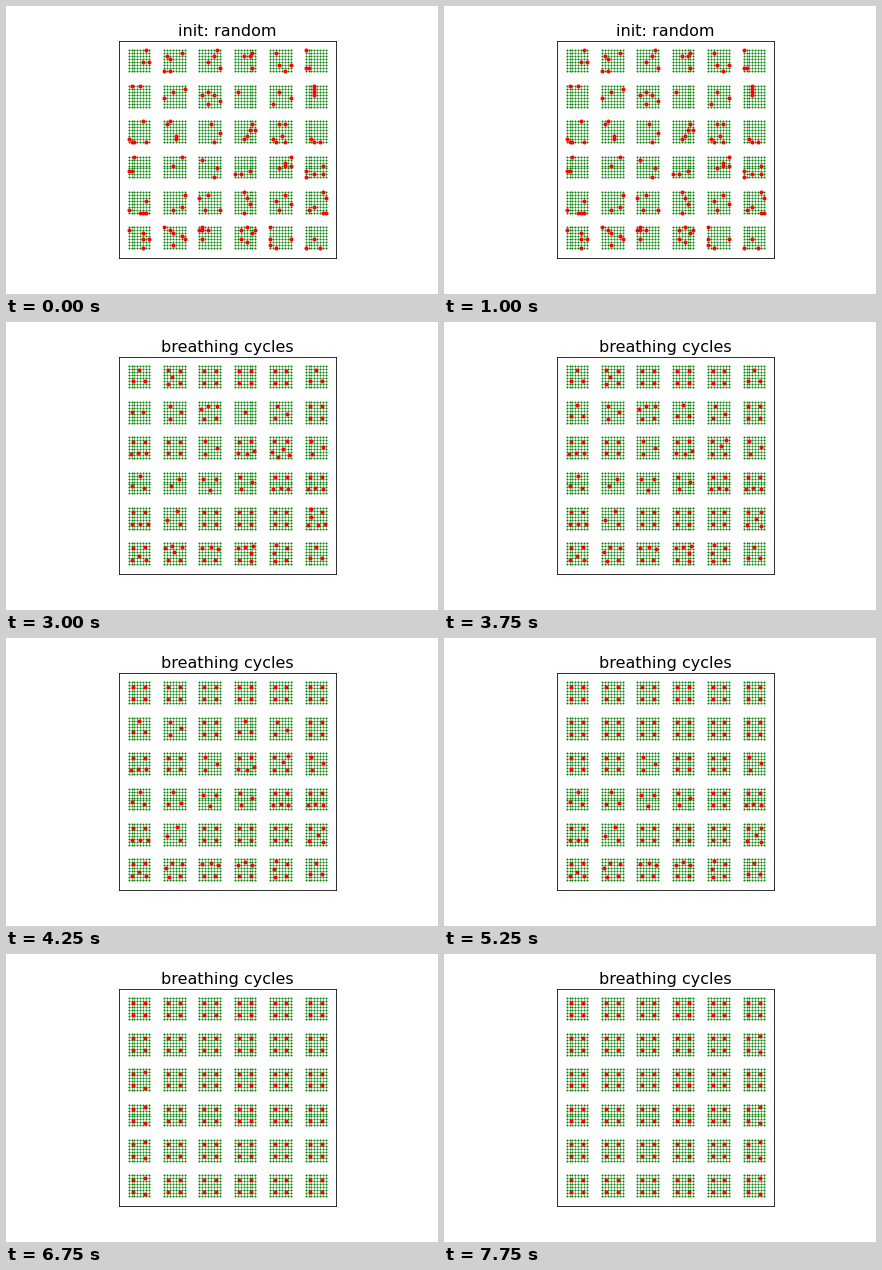
A matplotlib script for the animation above (8000 ms loop, 432 px wide and 288 px high).

```python
import itertools

import matplotlib.pyplot as plt
import numpy as np
from matplotlib.animation import FuncAnimation

TILES, SIDE, PITCH = 6, 8, 12
SPAN = PITCH * (TILES - 1) + SIDE - 1
INTRO, FRAMES, STEP_MS = 12, 32, 250
SETTLED = 15

# Centroids per tile at the start; four per tile is the optimum.
COUNTS = np.array([
    [3, 5, 4, 4, 4, 3],
    [2, 3, 5, 1, 3, 4],
    [5, 4, 3, 5, 6, 3],
    [3, 2, 3, 3, 5, 5],
    [5, 3, 4, 4, 4, 6],
    [5, 6, 5, 6, 5, 3],
])
CELLS = np.array(list(itertools.product(range(SIDE), repeat=2)), float)
QUAD = np.array(list(itertools.product((1.5, 5.5), repeat=2)))


def sample(row, col, k):
    rng = np.random.default_rng([row, col, k])
    return rng.choice(CELLS, k, replace=False)


def lloyd(centers, rounds=20):
    centers = centers.copy()
    for _ in range(rounds):
        gaps = ((CELLS[:, None] - centers) ** 2).sum(axis=2)
        owner = gaps.argmin(axis=1)
        for i in np.unique(owner):
            centers[i] = CELLS[owner == i].mean(axis=0)
    return centers


def fit(row, col, k):
    return QUAD if k == 4 else lloyd(sample(row, col, k))


def counts_at(cycle):
    """Each cycle moves centroids from the richest tile to the poorest."""
    counts = COUNTS.copy()
    for _ in range(cycle * 6 // 5):
        if counts.max() == counts.min():
            break
        counts.flat[counts.argmax()] -= 1
        counts.flat[counts.argmin()] += 1
    return counts


def swaying(cycle):
    """Tiles of one column still sway while a ripple crosses the grid."""
    if cycle < SETTLED:
        return set()
    col = round((cycle - SETTLED) * (TILES - 1) / 4)
    rows = np.random.default_rng(cycle).choice(TILES, 4, replace=False)
    return {(row, col) for row in rows}


def sway(centers):
    right = centers[:, 0] > SIDE / 2
    stretch = 0.7 * np.sign(centers[:, 1] - SIDE / 2)
    return centers + np.column_stack([0 * stretch, right * stretch])


def centroids(frame):
    cycle = frame - INTRO
    counts, moving = counts_at(max(cycle, 0)), swaying(cycle)
    points = []
    for row, col in np.ndindex(TILES, TILES):
        place = sample if cycle < 0 else fit
        spots = place(row, col, counts[row, col])
        if (row, col) in moving:
            spots = sway(spots)
        points.append(spots + (PITCH * col, PITCH * row))
    x, y = np.vstack(points).T
    return x, SPAN - y


def heading(frame):
    if frame >= INTRO:
        return "breathing cycles"
    return "* init: random *" if frame // 2 % 2 else "init: random"


plt.rcParams["font.family"] = "DejaVu Sans"
fig, ax = plt.subplots(figsize=(6, 4), dpi=72)
fig.subplots_adjust(left=0.125, right=0.9, bottom=0.125, top=0.88)

ticks = np.add.outer(PITCH * np.arange(TILES), np.arange(SIDE)).ravel()
gx, gy = np.meshgrid(ticks, ticks)
ax.plot(gx.ravel(), gy.ravel(), "g.", ms=2)
dots, = ax.plot([], [], "r.", ms=6)

margin = 0.05 * SPAN
ax.set(xlim=(-margin, SPAN + margin), ylim=(-margin, SPAN + margin),
       xticks=[], yticks=[], aspect="equal")
title = ax.set_title("", fontsize=16, pad=5)


def draw(frame):
    dots.set_data(*centroids(frame))
    title.set_text(heading(frame))
    return dots, title


anim = FuncAnimation(fig, draw, frames=FRAMES, interval=STEP_MS, repeat=True)
plt.show()
```
